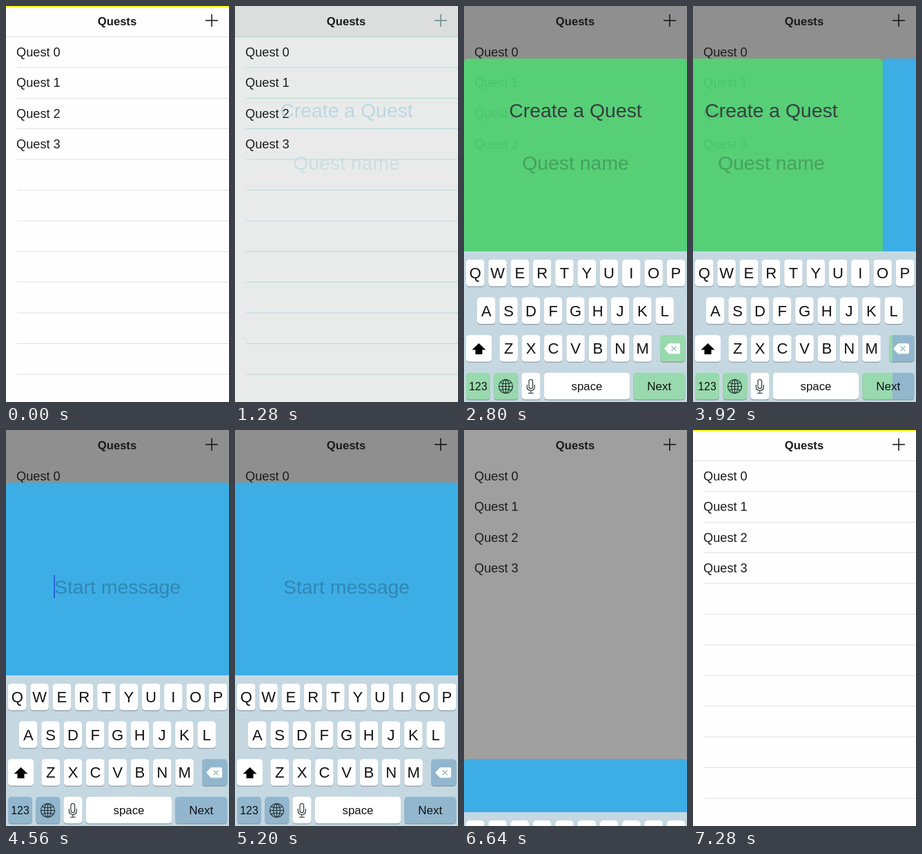
Animation, 323 px wide and 573 px high, one loop 7440 ms. Source, as an HTML page:

```html
<!DOCTYPE html>
<html lang="en">
<head>
<meta charset="utf-8">
<title>Quests</title>
<style>
  html, body { margin: 0; width: 100%; height: 100%; overflow: hidden; background: #fff; }
  svg { display: block; width: 100vw; height: 100vh; font-family: "Liberation Sans", Arial, sans-serif; }

  .lines, .edge, .dim, .bar, .plus, .card, .pages, .tint, .board, .words, .title, .hint, .caret, .caret2, .top {
    animation: 7440ms linear infinite both;
  }
  .middle { text-anchor: middle; }
  .row { font-size: 18.2px; fill: #1c1c1c; }
  .title, .hint { font-size: 28.4px; }

  .top { animation-name: top; }
  .lines, .edge { animation-name: lines; fill: none; stroke: #dedfe0; }
  .dim { animation-name: dim; }
  .bar { animation-name: bar; }
  .plus { animation-name: plus; stroke-width: 1.5; }
  .card { animation-name: card; }
  .pages { animation-name: pages; }
  .tint { animation-name: pages; animation-delay: -7415ms; }
  .board { animation-name: board; }
  .words { animation-name: words; }
  .title { animation-name: title; }
  .hint { animation-name: hint; }
  .caret { animation-name: caret; fill: #3f7dfb; }
  .caret2 { animation-name: caret2; fill: #2b62e0; }

  @keyframes top {
    0%, 15.04% { opacity: 1; }
    15.05%, 96.77% { opacity: 0; }
    96.78%, 100% { opacity: 1; }
  }
  @keyframes lines {
    0%, 15.05% { stroke: #dedfe0; opacity: 1; }
    17.2% { stroke: #cdeaf0; opacity: 1; }
    21.5% { stroke: #cdeaf0; opacity: 0; }
    21.6%, 90.5% { stroke: #dedfe0; opacity: 0; }
    95.7%, 100% { stroke: #dedfe0; opacity: 1; }
  }
  @keyframes dim {
    0%, 15.05% { opacity: 0; fill: #002318; }
    17.2% { opacity: .085; fill: #002318; }
    23.12%, 88.17% { opacity: .44; fill: #000; }
    95.7%, 100% { opacity: 0; fill: #000; }
  }
  @keyframes bar {
    0%, 15.05% { opacity: 0; }
    17.2% { opacity: .055; }
    21.5%, 100% { opacity: 0; }
  }
  @keyframes plus {
    0%, 15.05% { stroke: #111; }
    17.2% { stroke: #6a878d; }
    21.5%, 100% { stroke: #111; }
  }
  @keyframes card {
    0%, 17.3% { transform: translateY(500px); animation-timing-function: cubic-bezier(.2, .7, .3, 1); }
    23.9%, 80.68% { transform: translateY(0); animation-timing-function: cubic-bezier(.42, 0, 1, 1); }
    90.5%, 100% { transform: translateY(500px); }
  }
  @keyframes pages {
    0%, 50.54% { transform: translateX(0); animation-timing-function: ease-in-out; }
    58.6%, 96% { transform: translateX(-323px); animation-timing-function: step-end; }
    96.1%, 100% { transform: translateX(0); }
  }
  @keyframes board {
    0%, 21.51% { transform: translateY(220px); animation-timing-function: cubic-bezier(.2, .7, .3, 1); }
    28.33%, 84.98% { transform: translateY(0); animation-timing-function: ease-in-out; }
    90.46%, 100% { transform: translateY(220px); }
  }
  @keyframes words {
    0%, 15.05% { opacity: 0; }
    17.2% { opacity: .8; }
    20%, 76.34% { opacity: 1; }
    80.65%, 100% { opacity: 0; }
  }
  @keyframes title {
    0%, 17.2% { fill: #b2d3de; }
    22%, 100% { fill: #35403d; }
  }
  @keyframes hint {
    0%, 17.2% { fill: rgba(150, 200, 212, .42); }
    22%, 100% { fill: rgba(0, 0, 0, .215); }
  }
  @keyframes caret {
    0%, 23.65% { opacity: 0; }
    23.66%, 32.2% { opacity: 1; }
    32.3%, 38.7% { opacity: 0; }
    38.8%, 45.7% { opacity: 1; }
    45.8%, 100% { opacity: 0; }
  }
  @keyframes caret2 {
    0%, 61.2% { opacity: 0; }
    61.3%, 68.8% { opacity: 1; }
    68.9%, 100% { opacity: 0; }
  }
</style>
</head>
<body>
<svg viewBox="0 0 323 573" preserveAspectRatio="none">
  <defs><clipPath id="soft"></clipPath></defs>

  <rect width="323" height="573" fill="#fefefe"/>
  <path class="edge" d="M0 44.5H323" style="stroke-width:1.2"/>
  <path class="lines" id="lines"/>
  <rect class="dim" width="323" height="573"/>
  <rect class="bar" width="323" height="45"/>
  <rect class="top" width="323" height="1.6" fill="#fffb00"/>
  <text class="middle" x="161" y="28" font-size="16.6" font-weight="700" fill="#1a1a1a">Quests</text>
  <path class="plus" d="M289 21H307M298 12V30"/>
  <g id="rows"></g>

  <g class="card"><g class="pages">
    <rect y="76" width="323" height="520" rx="6" fill="#52d675" fill-opacity=".9"/>
    <rect x="323" y="76" width="323" height="520" rx="6" fill="#3dade5"/>
  </g></g>

  <g class="words"><g class="pages">
    <text class="title middle" x="161.5" y="161">Create a Quest</text>
    <text class="hint middle" x="161.5" y="236.5">Quest name</text>
    <rect class="caret" x="83" y="210" width="2" height="33"/>
    <text class="hint middle" x="484.5" y="236.5">Start message</text>
    <rect class="caret2" x="392" y="210" width="2" height="33"/>
  </g></g>

  <g class="board">
    <rect y="355" width="323" height="220" fill="#c5d8e1"/>
    <g id="shadows" fill="#8b9ba4"></g>
    <g clip-path="url(#soft)">
      <g class="tint">
        <rect y="355" width="323" height="218" fill="#98d9ad"/>
        <rect x="323" y="355" width="323" height="218" fill="#92b6cd"/>
      </g>
    </g>
    <g id="keys" fill="#fff"></g>
    <g id="labels" class="middle" fill="#111"></g>
    <path d="M21.5 488L31.5 497.5H26.5V504H16.5V497.5H11.5Z"/>
    <path d="M290 495.7L297 488.2H311Q313 488.2 313 490.2V501.2Q313 503.2 311 503.2H297Z" fill="#fff"/>
    <path d="M300.5 492.2L307.5 499.2M307.5 492.2L300.5 499.2" stroke="#97b9b9" stroke-width="1.3"/>
    <g fill="none" stroke="#1c2a2c" stroke-width="1.1">
      <circle cx="60.5" cy="550.5" r="10"/>
      <ellipse cx="60.5" cy="550.5" rx="4.8" ry="10"/>
      <path d="M60.5 540.5V560.5M50.5 550.5H70.5M52.5 545Q60.5 548.5 68.5 545M52.5 556Q60.5 552.5 68.5 556"/>
      <rect x="94" y="540.5" width="5.6" height="13" rx="2.8"/>
      <path d="M91.3 548V551Q91.3 556.3 96.8 556.3T102.3 551V548M96.8 556.3V560.3M92.8 560.3H100.8"/>
    </g>
  </g>
</svg>
<script>
  const $ = id => document.getElementById(id);

  function add(parent, tag, attrs, text) {
    const node = document.createElementNS("http://www.w3.org/2000/svg", tag);
    for (const name in attrs) node.setAttribute(name, attrs[name]);
    if (text) node.textContent = text;
    $(parent).append(node);
  }

  let path = "";
  for (let i = 1; i <= 11; i++) path += `M16 ${44.5 + Math.round(i * 88.8) / 2}H323`;
  $("lines").setAttribute("d", path);

  for (let i = 0; i < 4; i++) {
    add("rows", "text", { class: "row", x: 15, y: 73 + i * 44.4 }, "Quest " + i);
  }

  const rowTop = row => 367 + row * 54.6;

  function key(row, x, width, label, size, soft) {
    const y = rowTop(row);
    const box = { x, y, width, height: 38.5, rx: 4.5 };
    add("shadows", "rect", { ...box, y: y + 1.2 });
    add(soft ? "soft" : "keys", "rect", box);
    if (label) {
      add("labels", "text", { x: x + width / 2, y: y + 19.3 + size * .35, "font-size": size }, label);
    }
  }

  [["QWERTYUIOP", 3], ["ASDFGHJKL", 19], ["ZXCVBNM", 51.5]].forEach(([letters, left], row) => {
    [...letters].forEach((letter, i) => key(row, left + i * 32.3, 26.5, letter, 22));
  });
  key(2, 3, 37);
  key(2, 284, 36.5, "", 0, true);
  key(3, 3, 35, "123", 15.8, true);
  key(3, 43.3, 35, "", 0, true);
  key(3, 83.5, 27);
  key(3, 116, 124, "space", 16.8);
  key(3, 245.3, 75, "Next", 17, true);
</script>
</body>
</html>
```
